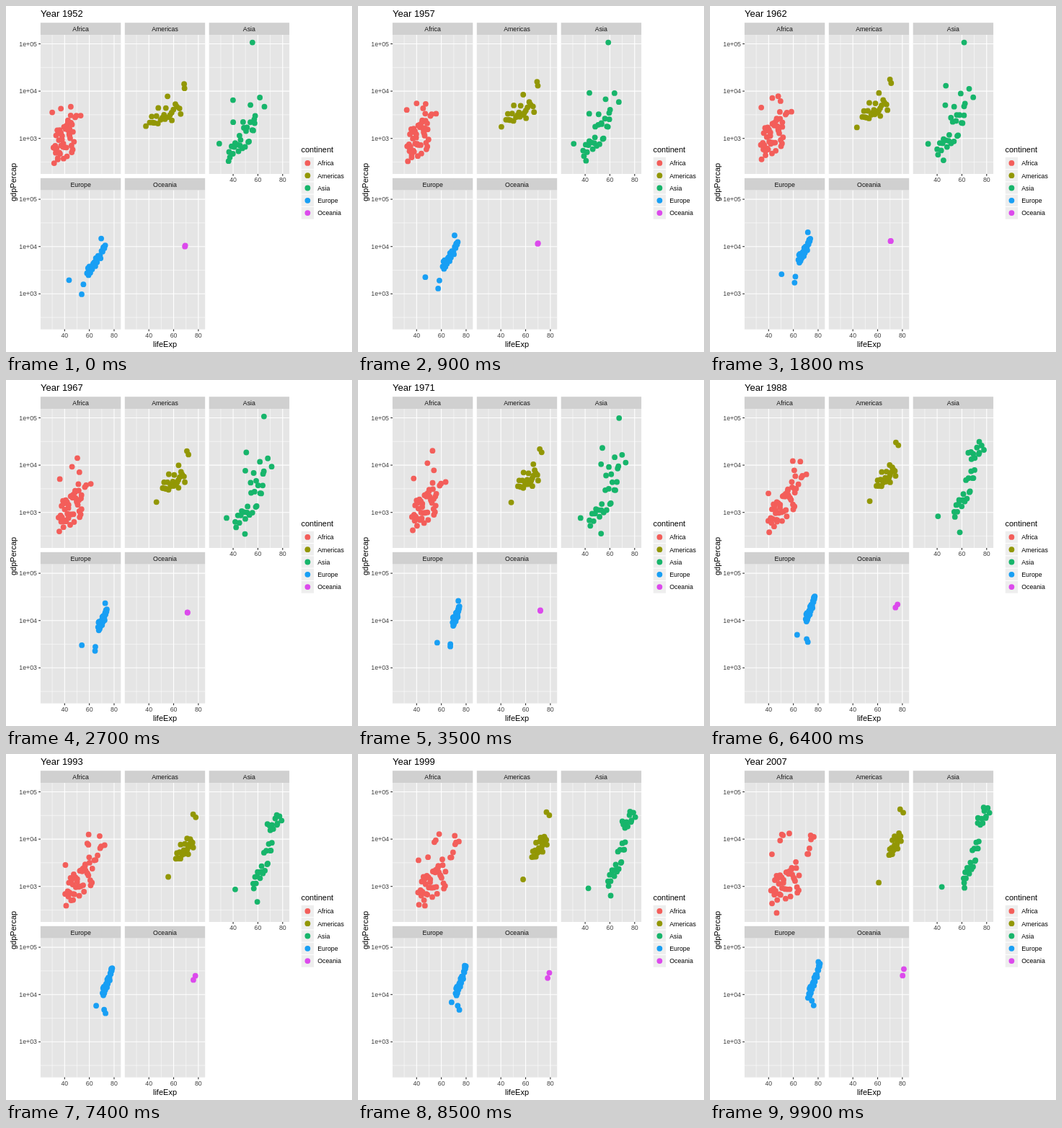
These frames come from a looping animation (480x480 px, 10000 ms). An HTML page:

```html
<!DOCTYPE html>
<html lang="en">
<head>
<meta charset="utf-8">
<title>Life expectancy and income</title>
<style>
html, body { margin: 0; width: 100%; height: 100%; overflow: hidden; background: #fff; }
svg { display: block; width: 480px; height: 480px; font: 8.8px "Liberation Sans", Arial, sans-serif; }
.axis { fill: #404040; }
.big { font-size: 11px; }
.mid { text-anchor: middle; }
.end { text-anchor: end; }
</style>
</head>
<body>
<svg id="stage" viewBox="0 0 480 480"></svg>
<script>
let seed = 11;
const random = () => (seed = seed * 16807 % 2147483647) / 2147483647;
const mix = (a, b, f) => a + (b - a) * f;

// Blends evenly spaced poses, number by number.
function blend(poses, u) {
  const s = u * (poses.length - 1), i = Math.min(s | 0, poses.length - 2);
  return poses[i].map((v, k) => mix(v, poses[i + 1][k], s - i));
}

// Incomes are log10. A loner follows its own [life, income] poses.
const loner = (...poses) => [u => blend(poses, u)];

// A crowd is strewn along a line; each pose is [life, income, life, income, spread].
const crowd = (count, ...poses) => Array.from({ length: count }, (_, i) => {
  const along = (i + random()) / count, off = random() * 2 - 1;
  return u => {
    const [life0, income0, life1, income1, spread] = blend(poses, u);
    return [mix(life0, life1, along), mix(income0, income1, along) + off * spread];
  };
});

// Poses fall on 1952, 1970, 1989 and 2007.
const groups = [
  { name: "Africa", color: "#f35e5a", dots: [
    ...crowd(39, [31, 2.85, 47, 3.1, .42], [36, 2.95, 55, 3.3, .37], [40, 2.85, 62, 3.4, .32], [42, 2.95, 65, 3.2, .35]),
    ...crowd(6, [42, 3.2, 53, 3.4, .15], [51, 3.25, 63, 3.55, .15], [61, 3.5, 71, 3.75, .12], [71, 3.68, 76.5, 3.95, .18]),
    ...loner([42.7, 3.38], [52, 4.32], [66.5, 4.06], [74, 4.08]),
    ...loner([37, 3.63], [48, 4.04], [60.3, 4.09], [56.7, 4.12]),
    ...loner([45, 3.67], [53.5, 3.89], [61.2, 3.89], [49.3, 3.97]),
    ...loner([47.6, 2.93], [55, 3.1], [62, 3.81], [50.7, 4.1]),
    ...loner([34.5, 2.58], [40, 2.86], [46, 2.99], [51.6, 4.08]),
    ...loner([30, 3.55], [37.5, 3.74], [40, 3.38], [42.7, 3.68]),
    ...loner([39, 2.89], [44, 2.88], [47, 2.8], [46.5, 2.44])
  ] },
  { name: "Americas", color: "#929705", dots: [
    ...crowd(21, [40, 3.38, 66, 3.65, .2], [53, 3.6, 70, 3.8, .2], [59, 3.6, 75, 3.9, .18], [69, 3.7, 79, 4.08, .18]),
    ...loner([68.5, 4.15], [71.2, 4.33], [75, 4.49], [78.2, 4.63]),
    ...loner([68.8, 4.06], [72.7, 4.26], [77, 4.43], [80.7, 4.56]),
    ...loner([55.1, 3.89], [66, 4.02], [70, 4], [73.7, 4.06]),
    ...loner([37.6, 3.26], [48, 3.21], [54, 3.24], [60.9, 3.08])
  ] },
  { name: "Asia", color: "#17b56b", dots: [
    ...crowd(20, [36, 2.7, 58, 3.2, .28], [42, 2.8, 66, 3.5, .3], [54, 3, 71, 3.8, .28], [61, 3.15, 74, 3.85, .25]),
    ...crowd(9, [40, 3.2, 66, 3.7, .25], [52, 3.9, 73, 4.05, .18], [66, 4.22, 78.5, 4.35, .1], [73, 4.38, 82.5, 4.57, .12]),
    ...loner([55.6, 5.03], [67, 5.03], [74.5, 4.46], [77.6, 4.67]),
    ...loner([39.9, 3.81], [53, 4.37], [68.3, 4.27], [72.8, 4.34]),
    ...loner([28.8, 2.89], [36, 2.88], [41, 2.92], [43.8, 2.99]),
    ...loner([36.3, 2.52], [52.5, 2.55], [58.7, 2.58], [62.1, 2.97])
  ] },
  { name: "Europe", color: "#189ff4", dots: [
    ...crowd(26, [58, 3.42, 73, 3.97, .09], [69, 3.94, 74.5, 4.22, .1], [70, 4.02, 77.6, 4.47, .09], [72.5, 4, 81.6, 4.6, .09]),
    ...loner([43.6, 3.29], [56.2, 3.52], [63.5, 3.71], [71.8, 3.93]),
    ...loner([55.2, 3.2], [67, 3.5], [72, 3.55], [76.4, 3.77]),
    ...loner([53.8, 2.99], [67, 3.44], [71, 3.62], [74.9, 3.87]),
    ...loner([69.6, 4.17], [73.5, 4.41], [77, 4.5], [80.2, 4.69])
  ] },
  { name: "Oceania", color: "#dc4aec", dots: [
    ...loner([69.1, 4], [71.6, 4.21], [76.4, 4.35], [81.2, 4.54]),
    ...loner([69.4, 4.02], [71.7, 4.2], [74.6, 4.28], [80.2, 4.4])
  ] }
];

const COL = 116.9, ROW = 215.6;
const px = life => 81.3 + (life - 40) * 1.717;
const py = income => 52.5 + (5 - income) * 65.6;

const rect = (x, y, w, h, fill) => `<rect x="${x}" y="${y}" width="${w}" height="${h}" fill="${fill}"/>`;
const text = (x, y, str, cls = "", more = "") => `<text x="${x}" y="${y}" class="${cls}" ${more}>${str}</text>`;
const line = (d, width, color = "#fff") => `<path d="${d}" stroke="${color}" stroke-width="${width}"/>`;
const circle = (x, y, color) => `<circle cx="${x}" cy="${y}" r="3.9" fill="${color}"/>`;

function panel({ name, color, dots }, i) {
  const col = i % 3, row = i / 3 | 0;
  const across = (income, w) => line(`M47.9 ${py(income)}h111.4`, w);
  const down = (life, w) => line(`M${px(life)} 40.1v192.9`, w);
  let s = rect(47.9, 23.2, 111.4, 16.9, "#d0d0d0") + rect(47.9, 40.1, 111.4, 192.9, "#e5e5e5");
  s += [4.5, 3.5, 2.5].map(v => across(v, .53)).join("") + [30, 50, 70].map(v => down(v, .53)).join("");
  s += [5, 4, 3].map(v => across(v, 1.07)).join("") + [40, 60, 80].map(v => down(v, 1.07)).join("");
  s += text(103.6, 35.2, name, "mid", 'fill="#111"');
  if (col === 0) for (const v of [5, 4, 3])
    s += line(`M45.2 ${py(v)}h2.7`, 1.07, "#252525") + text(43, py(v) + 3.1, `1e+0${v}`, "axis end");
  if (row === 1 || col === 2) for (const v of [40, 60, 80])
    s += line(`M${px(v)} 233v2.7`, 1.07, "#252525") + text(px(v), 244.2, v, "axis mid");
  s += `<g class="dots">${dots.map(() => circle(0, 0, color)).join("")}</g>`;
  return `<g transform="translate(${col * COL} ${row * ROW})">${s}</g>`;
}

function legendItem({ name, color }, i) {
  const y = 209.3 + i * 17.28;
  return rect(409.8, y, 17.28, 17.28, "#eee") + line(`M409.8 ${y}h17.28`, 1.07) +
    circle(418.4, y + 8.64, color) + text(432.2, y + 12.05, name);
}

const stage = document.getElementById("stage");
stage.innerHTML = groups.map(panel).join("") +
  text(48, 15, "", "", 'id="year" font-size="13"') +
  text(220.5, 472.8, "lifeExp", "big mid") +
  text(0, 0, "gdpPercap", "big mid", 'transform="translate(14.3 244.4) rotate(-90)"') +
  text(409.5, 203, "continent", "big") + groups.map(legendItem).join("");

const year = document.getElementById("year");
const circles = [...stage.querySelectorAll(".dots")].map(g => [...g.children]);

function draw(now) {
  const u = Math.floor(now / 100) % 100 / 99;
  year.textContent = `Year ${Math.round(1952 + 55 * u)}`;
  groups.forEach(({ dots }, i) => dots.forEach((dot, j) => {
    const [life, income] = dot(u);
    circles[i][j].setAttribute("cx", px(life));
    circles[i][j].setAttribute("cy", py(income));
  }));
  requestAnimationFrame(draw);
}
draw(performance.now());
</script>
</body>
</html>
```
